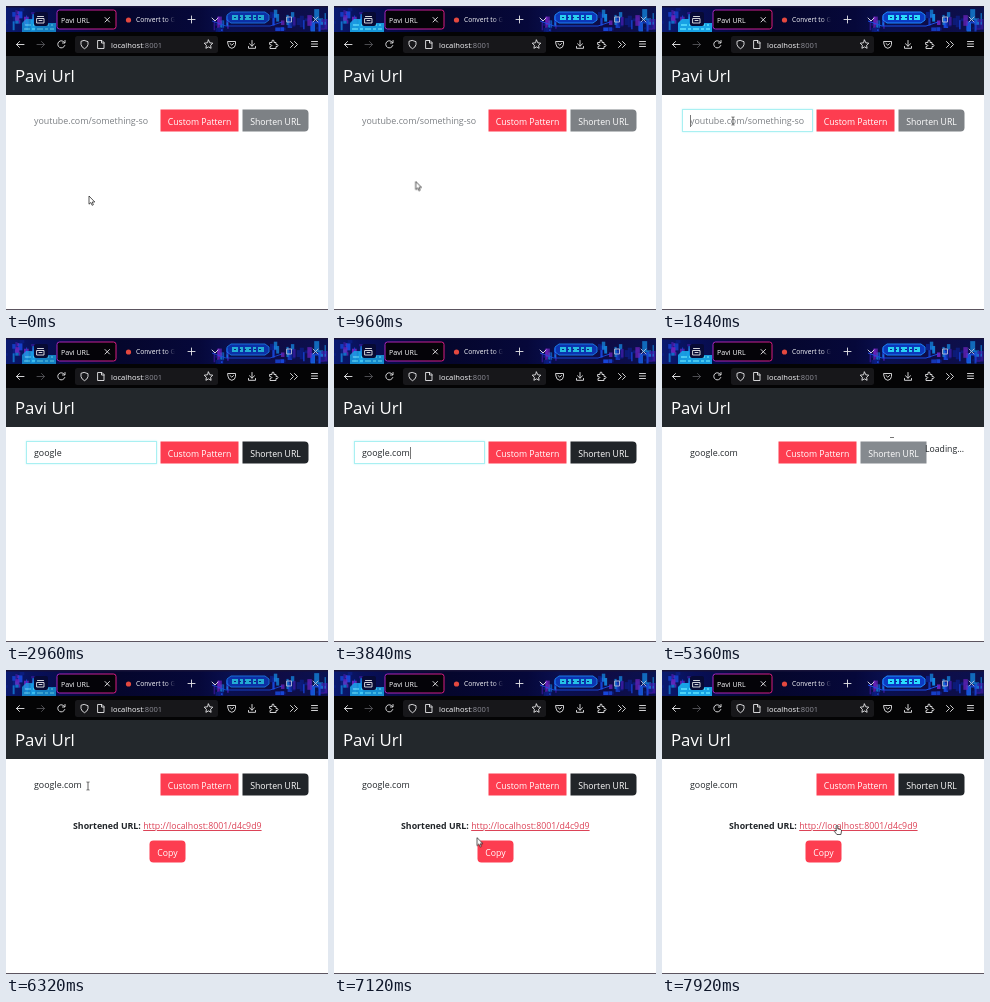
Animation, 322 px wide and 304 px high, one loop 8 s. Source, as an HTML page:

```html
<!DOCTYPE html>
<html lang="en">
<head>
<meta charset="utf-8">
<title>Pavi URL</title>
<style>
html, body { margin: 0; width: 100%; height: 100%; overflow: hidden; background: #fff; }
#stage { position: relative; width: 322px; height: 304px; overflow: hidden; background: #fff;
  font: 8.9px/20px "Open Sans", "Noto Sans", sans-serif; color: #212529; --loop: 8s infinite; }
#stage > *, .btn { position: absolute; }
.t { white-space: pre; }
.btn { box-sizing: border-box; height: 22px; top: 103px; line-height: 24px; text-align: center;
  color: #fff; background: #fd3d50; font-size: 8.7px; font-weight: 500; transform: translate(.5px, .5px); }

/* browser */
#chrome { left: 0; top: 0; }
.tab { font-size: 7.1px; color: #fbfbfe; top: 4px; }
.fade { width: 39px; overflow: hidden; font-size: 6.7px; -webkit-mask: linear-gradient(90deg, #000 75%, transparent);
  mask: linear-gradient(90deg, #000 75%, transparent); }
.line { fill: none; stroke: #e8e8ea; stroke-width: .9; stroke-linecap: round; stroke-linejoin: round; }
.glow { animation: glow 1.6s ease-in-out infinite alternate; }
@keyframes glow { from { opacity: .75 } to { opacity: 1 } }

/* page */
#bar { left: 0; top: 50px; width: 322px; height: 39px; background: #23282c; }
#brand { left: 9px; top: 60px; font-size: 16.8px; color: #fff; }
#ring { left: 20px; top: 103px; width: 129px; height: 21px; border: 1px solid #a9f0f2;
  box-shadow: 0 0 2px #c4f6f7; animation: ring var(--loop); }
@keyframes ring { 0%, 20% { opacity: 0 } 21.5%, 66% { opacity: 1 } 66.1%, 100% { opacity: 0 } }
#hint { left: 28px; top: 105px; width: 115px; overflow: hidden; color: #7b7f83;
  animation: hint var(--loop) step-end; }
@keyframes hint { 0% { opacity: 1 } 25%, 100% { opacity: 0 } }
#field { left: 28px; top: 105px; }
#field::before { content: ""; animation: type var(--loop) step-end; }
@keyframes type {
  0% { content: "" } 25% { content: "g" } 26.25% { content: "go" } 27.25% { content: "goo" }
  28.25% { content: "goog" } 29.25% { content: "googl" } 30.25% { content: "google" }
  40% { content: "google." } 42.75% { content: "google.c" } 44.5% { content: "google.co" }
  46.25%, 100% { content: "google.com" }
}
#caret { display: inline-block; width: 1px; height: 12px; background: #777; vertical-align: -3px;
  animation: caret var(--loop) step-end; }
@keyframes caret {
  0% { opacity: 0 } 20% { opacity: 1 } 36.5% { opacity: 0 } 40% { opacity: 1 }
  52.5% { opacity: 0 } 58.75% { opacity: 1 } 65%, 100% { opacity: 0 }
}
#buttons { left: 0; top: 0; animation: shift var(--loop) step-end; }
@keyframes shift { 0% { transform: none } 66% { transform: translateX(-38px) } 69.5%, 100% { transform: none } }
#pattern { left: 154px; width: 78px; }
#shorten { left: 236px; width: 66px; border-radius: 0 4px 4px 0; animation: enable var(--loop), corner var(--loop) step-end; }
@keyframes enable {
  0%, 25% { background: #7d8185 } 26.9%, 65.8% { background: #212529 }
  66.4%, 69.5% { background: #858a8f } 71.4%, 100% { background: #212529 }
}
@keyframes corner { 0% { border-radius: 0 4px 4px 0 } 66% { border-radius: 0 } 69.5%, 100% { border-radius: 0 4px 4px 0 } }
.loading { animation: loading var(--loop) step-end; }
@keyframes loading { 0% { opacity: 0 } 66% { opacity: 1 } 69.5%, 100% { opacity: 0 } }
#wait { left: 263px; top: 101px; font-size: 8.7px; }
#dash { left: 228px; top: 99px; width: 4px; height: 1px; background: #777; }
#result { left: 0; top: 0; animation: result var(--loop) step-end; }
@keyframes result { 0% { opacity: 0 } 69.5%, 100% { opacity: 1 } }
#result > * { position: absolute; }
#short { left: 67px; top: 146px; font-size: 8.8px; }
#short a { color: #dc4357; text-decoration: underline; text-underline-offset: 1px; }
#copy { left: 143px; top: 170px; width: 36px; border-radius: 4px; }
#edge { left: 0; top: 303px; width: 322px; height: 1px; background: #5c5560; }

/* pointer */
#pointer { left: 0; top: 0; overflow: visible; animation: move var(--loop) ease-in-out; }
#pointer path { stroke-width: .7; stroke-linejoin: round; }
@keyframes move {
  0%, 5% { transform: translate(83px, 190px) } 11% { transform: translate(82px, 177px) }
  20%, 56% { transform: translate(71px, 115px) } 59% { transform: translate(289px, 100px) }
  62% { transform: translate(264px, 114px) } 65%, 69% { transform: translate(241px, 115px) }
  77%, 80% { transform: translate(82px, 116px) } 88% { transform: translate(140px, 166px) }
  92%, 94% { transform: translate(163px, 178px) } 99%, 100% { transform: translate(175px, 155px) }
}
#arrow { animation: arrow var(--loop) step-end; }
@keyframes arrow {
  0% { opacity: 1 } 18.3% { opacity: 0 } 57.7% { opacity: 1 } 60.5% { opacity: 0 }
  69.5% { opacity: 1 } 75% { opacity: 0 } 82.5% { opacity: 1 } 90%, 100% { opacity: 0 }
}
#beam { animation: beam var(--loop) step-end; }
@keyframes beam {
  0% { opacity: 0 } 18.3% { opacity: 1 } 25% { opacity: 0 } 56% { opacity: 1 } 57.7% { opacity: 0 }
  75% { opacity: 1 } 82.5%, 100% { opacity: 0 }
}
#hand { animation: hand var(--loop) step-end; }
@keyframes hand { 0% { opacity: 0 } 60.5% { opacity: 1 } 66% { opacity: 0 } 90%, 100% { opacity: 1 } }
</style>
</head>
<body>
<div id="stage">
  <svg id="chrome" width="322" height="50" viewBox="0 0 322 50">
    <defs>
      <linearGradient id="sky">
        <stop offset="0" stop-color="#0a1a70"/><stop offset=".1" stop-color="#080f58"/>
        <stop offset=".35" stop-color="#05062c"/><stop offset=".6" stop-color="#06083a"/>
        <stop offset=".7" stop-color="#0a1050"/><stop offset=".85" stop-color="#0f0c46"/>
        <stop offset="1" stop-color="#0a1250"/>
      </linearGradient>
      <linearGradient id="neon"><stop stop-color="#a824c0"/><stop offset="1" stop-color="#d81c80"/></linearGradient>
    </defs>
    <rect width="322" height="50" fill="#040405"/>
    <rect width="322" height="26" fill="url(#sky)"/>
    <g id="city"></g>
    <g class="glow">
      <path d="M16 26v-9l4-4h7v4h23v9z" fill="#18a4e6"/>
      <path d="M19 19h28M18 23h30" stroke="#5ce4ff" stroke-width="1.6" stroke-dasharray="6 2 3 2"/>
    </g>
    <rect x="28" y="6" width="14" height="14" rx="2" fill="#070a34"/>
    <g class="glow">
      <path d="M225 6h34l4 3v5l-4 3h-34l-4-3v-5z" fill="#0c3cc4" stroke="#1f8cff"/>
      <path d="M226 11.500h33" stroke="#2ce0ff" stroke-width="5" stroke-dasharray="6 2 3 2"/>
      <path d="M228 11.500h29" stroke="#0a2a90" stroke-dasharray="2 3"/>
      <path d="M206 15l14 5h44l12-4" fill="none" stroke="#1b50e8"/>
    </g>
    <rect width="322" height="1.5" fill="#171238"/>
    <rect x="51" y="4" width="59" height="19" rx="2.5" fill="#040308" stroke="url(#neon)"/>
    <circle cx="122.500" cy="14" r="2.6" fill="#e4483f"/>
    <g class="line">
      <path d="M31 12.500h7v4.500h-7zM31.500 10.500h6M33 14.500h3"/>
      <path d="M99 11.500l4.500 4.500M103.500 11.500l-4.500 4.500"/>
      <path d="M182 13.500h7M185.500 10v7"/>
      <path d="M206 12l3 3 3-3"/>
      <path d="M281 11h4.500v5h-4.500zM307 11l5 5M312 11l-5 5" stroke="#b8bcd8"/>
    </g>
    <rect x="69" y="30" width="143" height="17" rx="2.500" fill="#17171a"/>
    <g class="line">
      <path d="M10.500 38.500h7.500M13.500 35.500l-3 3 3 3"/>
      <path d="M31 38.500h7.500M35.500 35.500l3 3-3 3" stroke="#55555a"/>
      <path d="M58.500 36.500a3.600 3.600 0 1 0 .3 3M59 34.500v2.500h-2.500"/>
      <path d="M78.500 34.500l3.500 1.200v2.800q-.5 2.800-3.500 4.200-3-1.400-3.500-4.200v-2.800z"/>
      <path d="M92 34.500h4l2 2v6h-6zM95.500 34.500v2.500h2.500"/>
      <path d="M202.500 34l1.300 2.800 3 .4-2.200 2.100.5 3-2.600-1.400-2.600 1.400.5-3-2.200-2.100 3-.4z"/>
      <path d="M222 35.500h7.500v3q-.5 3.500-3.700 3.800-3.300-.3-3.800-3.800zM224 37.500l1.800 1.700 1.800-1.700"/>
      <path d="M246 34.500v5.500M243.500 37.800l2.500 2.400 2.500-2.400M242.500 40.500v1.800h7v-1.800"/>
      <path d="M264 36.500h2q-.5-2.500 1-2.500t1 2.500h2v2q2-.3 2 1t-2 1v2h-6v-2q1.800-.2 1.800-1t-1.800-1z"/>
      <path d="M284.500 35.500l3 3-3 3M288.500 35.500l3 3-3 3"/>
      <path d="M305.500 35.500h6M305.500 38h6M305.500 40.500h6"/>
    </g>
  </svg>
  <span class="t tab" style="left:55px">Pavi URL</span>
  <span class="t tab fade" style="left:130px">Convert to GIF</span>
  <span class="t" style="left:105px;top:28.500px;font-size:7.6px;color:#fbfbfe">localhost<span style="color:#8f8f98">:8001</span></span>

  <div id="bar"></div>
  <span id="brand" class="t">Pavi Url</span>
  <div id="ring"></div>
  <span id="hint" class="t">youtube.com/something-something</span>
  <span id="field" class="t"><i id="caret"></i></span>
  <div id="buttons">
    <div id="pattern" class="btn t">Custom Pattern</div>
    <div id="shorten" class="btn t">Shorten URL</div>
  </div>
  <span id="wait" class="t loading">Loading...</span>
  <div id="dash" class="loading"></div>
  <div id="result">
    <span id="short" class="t"><b>Shortened URL:</b> <a>http://localhost:8001/d4c9d9</a></span>
    <div id="copy" class="btn">Copy</div>
  </div>
  <div id="edge"></div>

  <svg id="pointer" width="1" height="1">
    <path id="arrow" d="M0 0v8.200l1.900-1.700 1.200 2.800 1.300-.6-1.200-2.700h2.600z" fill="#fff" stroke="#111"/>
    <path id="beam" d="M-1.500-4h1.200l.3.400.3-.4h1.200M0-3.600v7.200M-1.500 4h1.200l.3-.4.3.4h1.200" fill="none" stroke="#222"/>
    <path id="hand" d="M-.8 6V.8q.8-1.300 1.600 0v3l3 .8q.9.4.7 1.500l-.6 3.400h-4l-2.600-3.200q.4-1.200 1.900-.3z" fill="#fff" stroke="#111"/>
  </svg>
</div>
<script>
// Neon skyline behind the tabs
const city = document.getElementById("city");
const tones = ["#1746d8", "#1488e0", "#3a1a9c", "#0c1f86", "#6a22b8"];
let seed = 7;
const rnd = () => (seed = seed * 16807 % 2147483647) / 2147483647;

function block(from, to, low) {
  const r = document.createElementNS("http://www.w3.org/2000/svg", "rect");
  const h = 2 + rnd() * 10;
  const set = {
    x: from + rnd() * (to - from), y: low + rnd() * (26 - low - h),
    width: 1 + rnd() * 4, height: h,
    fill: tones[Math.floor(rnd() * tones.length)], opacity: .75
  };
  for (const k in set) r.setAttribute(k, set[k]);
  if (rnd() < .4) {
    r.setAttribute("class", "glow");
    r.style.animationDelay = -rnd() * 3.2 + "s";
  }
  city.append(r);
}
for (let i = 0; i < 24; i++) block(0, 28, 2);
for (let i = 0; i < 14; i++) block(204, 222, 10);
for (let i = 0; i < 34; i++) block(262, 320, 3);
</script>
</body>
</html>
```
